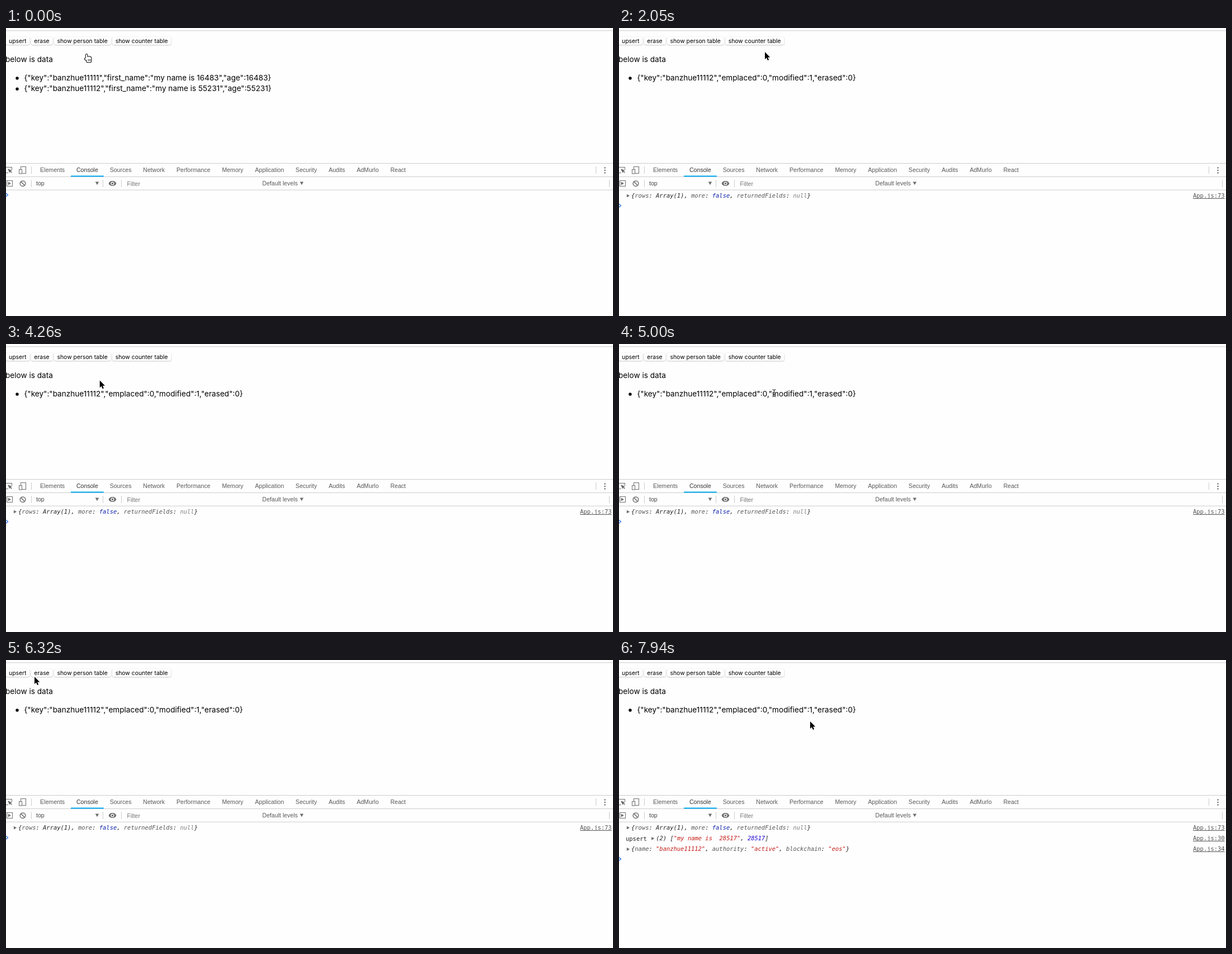
An HTML page with a canvas that plays this animation: 1086x516 px, repeating every 8 s.

```html
<!DOCTYPE html>
<html lang="en">
<head>
<meta charset="utf-8">
<title>Table viewer</title>
<style>
html, body { margin: 0; width: 100%; height: 100%; overflow: hidden; background: #fefefe; }
canvas { display: block; }
</style>
</head>
<body>
<canvas id="stage" width="1086" height="516"></canvas>
<script>
const ctx = document.getElementById('stage').getContext('2d');
const W = 1086, H = 516, LOOP = 8000, STEP = 147;
const PAGE = '13.6px Inter, "Noto Sans", sans-serif';
const BUTTON = '10.4px Inter, "Noto Sans", sans-serif';
const TOOL = '10.6px "Liberation Sans", Arial, sans-serif';
const MONO = '10.46px "DejaVu Sans Mono", monospace';
const INK = '#6e6e6e', RULE = '#ccc', DARK = '#222';
const ROW = 19.2;

const user = 'banzhue1111';
const person = (n, age) => `{"key":"${user}${n}","first_name":"my name is ${age}","age":${age}}`;
const people = [person(1, 16483), person(2, 55231)];
const counters = [`{"key":"${user}2","emplaced":0,"modified":1,"erased":0}`];
const buttons = ['upsert', 'erase', 'show person table', 'show counter table'];
const tabs = ['Elements', 'Console', 'Sources', 'Network', 'Performance', 'Memory',
  'Application', 'Security', 'Audits', 'AdMurlo', 'React'];
const logs = [
  { at: 11, link: 'App.js:73', body: '{rows: Array(1), more: false, returnedFields: null}' },
  { at: 47, link: 'App.js:30', label: 'upsert', body: '(2) ["my name is  28517", 28517]' },
  { at: 48, link: 'App.js:34', body: `{name: "${user}2", authority: "active", blockchain: "eos"}` }
];

// Pointer waypoints: step, x, y
const path = [
  [0, 140, 46], [2, 64, 36], [6, 195, 31], [8, 255, 23], [10, 255, 23], [14, 261, 43],
  [17, 253, 105], [19, 331, 95], [24, 125.5, 90], [26, 86, 90], [30, 195, 57],
  [34, 277.5, 88], [38, 380, 103], [43, 51, 30], [45, 19, 25], [47, 19, 25], [54, 342, 110]
];

function text(s, x, y, font, color) {
  ctx.font = font;
  ctx.fillStyle = color;
  ctx.fillText(s, x, y);
  return x + ctx.measureText(s).width;
}

function rect(x, y, w, h, color) {
  ctx.fillStyle = color;
  ctx.fillRect(x, y, w, h);
}

function box(x, y, w, h) {
  ctx.strokeStyle = INK;
  ctx.lineWidth = 1;
  ctx.strokeRect(x, y, w, h);
}

function line(points, color, width = 1) {
  ctx.beginPath();
  points.forEach(([x, y]) => ctx.lineTo(x, y));
  ctx.strokeStyle = color;
  ctx.lineWidth = width;
  ctx.stroke();
}

function dot(x, y, r, color) {
  ctx.beginPath();
  ctx.arc(x, y, r, 0, 7);
  ctx.fillStyle = color;
  ctx.fill();
}

// Triangle around a centre, pointing right or down
function triangle(x, y, r, down) {
  ctx.save();
  ctx.translate(x, y);
  if (down) ctx.rotate(Math.PI / 2);
  ctx.beginPath();
  ctx.moveTo(-r * .9, -r);
  ctx.lineTo(r * .9, 0);
  ctx.lineTo(-r * .9, r);
  ctx.fillStyle = INK;
  ctx.fill();
  ctx.restore();
}

// Outline first, fill on top, so overlapping parts merge
function silhouette(shape, fill, edge, width) {
  ctx.strokeStyle = edge;
  ctx.lineWidth = width;
  ctx.stroke(shape);
  ctx.fillStyle = fill;
  ctx.fill(shape);
}

const arrowShape = new Path2D('M0 0V13L3 10.3L5 15L7.2 14L5.2 9.5H9.3Z');
const handShape = new Path2D();
handShape.roundRect(2.8, 1, 2.6, 10, 1.3);
handShape.roundRect(1, 8, 6, 3, 1.5);
handShape.roundRect(4, 5.5, 8.4, 9.8, 2.5);

const arrow = () => silhouette(arrowShape, '#000', '#fff', 2);

function hand() {
  silhouette(handShape, '#fff', '#000', 2);
  for (let x = 7; x < 12; x += 2) line([[x, 10], [x, 13]], '#000', .8);
}

function beam() {
  for (const [color, width] of [['#fff', 2.2], [DARK, 1.1]]) {
    line([[0, -6], [0, 6]], color, width);
    for (const y of [-6.5, 6.5]) line([[-3, y], [0, y * .85], [3, y]], color, width);
    line([[-1.8, 2.5], [1.8, 2.5]], color, width);
  }
}

function button(label, x) {
  ctx.font = BUTTON;
  const width = ctx.measureText(label).width;
  ctx.save();
  ctx.beginPath();
  ctx.roundRect(x - 5.5, 16, width + 11.5, 14.2, 3.5);
  ctx.shadowColor = 'rgba(0,0,0,.35)';
  ctx.shadowBlur = 1.5;
  ctx.shadowOffsetY = .6;
  ctx.fillStyle = '#fff';
  ctx.fill();
  ctx.restore();
  return text(label, x, 27, BUTTON, '#000') + 13.8;
}

function page(rows) {
  rect(0, 4.3, W, 1, RULE);
  buttons.reduce((x, label) => button(label, x), 5);
  text('below is data', -1, 61, PAGE, '#000');
  rows.forEach((row, i) => {
    dot(20, 90 + i * ROW, 2.7, '#000');
    text(row, 32.5, 94 + i * ROW, PAGE, '#000');
  });
}

function tabBar() {
  rect(0, 242, W, 1, RULE);
  rect(0, 266, W, 1, RULE);
  let x = 61;
  for (const name of tabs) {
    const active = name === 'Console';
    const end = text(name, x, 258, TOOL, active ? '#333' : '#5a5a5a');
    if (active) rect(x - 10, 264.5, end - x + 20, 2, '#03a9f4');
    x = end + 20.8;
  }
  box(-1, 249.5, 11.5, 10);
  rect(4, 254, 8, 7, '#fefefe');
  ctx.save();
  ctx.translate(3, 252);
  ctx.rotate(-.4);
  ctx.scale(.65, .65);
  ctx.fillStyle = INK;
  ctx.fill(arrowShape);
  ctx.restore();
  box(26.5, 248.5, 9, 12);
  rect(23, 253, 6, 8, '#fefefe');
  box(23.5, 253.5, 5, 7.5);
  for (const s of [45, 1055]) rect(s, 248, 1, 13, RULE);
  for (let y = 250.5; y < 260; y += 4.5) dot(1071.5, y, 1.3, INK);
}

function filterBar() {
  rect(0, 289.7, W, 1, RULE);
  for (const x of [45, 173, 206, 1079]) rect(x, 272, 1, 13, RULE);
  box(1.5, 273.5, 10, 10);
  triangle(6.3, 278.5, 3);
  ctx.beginPath();
  ctx.arc(30, 278.7, 4.8, 0, 7);
  ctx.strokeStyle = INK;
  ctx.lineWidth = 1.5;
  ctx.stroke();
  line([[26.7, 275.4], [33.3, 282]], INK, 1.5);
  ctx.beginPath();
  ctx.ellipse(190.5, 278.5, 6.7, 4.4, 0, 0, 7);
  ctx.fillStyle = INK;
  ctx.fill();
  dot(190.5, 278.5, 3, '#fff');
  dot(190.5, 278.5, 1.7, INK);
  text('top', 54, 282, TOOL, '#444');
  text('Filter', 216.5, 282.5, TOOL, '#777');
  text('Default levels', 458.5, 282, TOOL, '#5a5a5a');
  for (const x of [163, 529]) triangle(x, 278.3, 3.2, true);
}

function tokenColor(token, next) {
  if (token[0] === '"') return '#c41a16';
  if (token === 'null') return '#808080';
  if (token === 'false') return '#0d22aa';
  if (/^\d{5}$/.test(token)) return '#1c00cf';
  return next?.startsWith(':') ? '#565656' : DARK;
}

function log({ link, label, body }, i) {
  const y = 304 + i * ROW;
  let x = 14;
  if (label) x = text(label, 12, y + .5, MONO, DARK) + 8.5;
  triangle(x + 2.5, y - 3.4, 2.9);
  x += 8;
  const tokens = body.split(/("[^"]*"|\w+(?=:)|false|null|\b\d{5}\b)/);
  tokens.forEach((token, k) => {
    if (token) x = text(token, x, y, 'italic ' + MONO, tokenColor(token, tokens[k + 1]));
  });
  const end = text(link, 1027, y - .5, MONO, '#545454');
  rect(1027, Math.round(y + 1), end - 1027, 1, '#545454');
}

function pointer(step) {
  const i = path.findLastIndex(p => p[0] <= step);
  const a = path[i], b = path[i + 1] || a;
  const k = (step - a[0]) / (b[0] - a[0] || 1);
  const x = a[1] + (b[1] - a[1]) * k, y = a[2] + (b[2] - a[2]) * k;
  const onButton = step < 1 || y < 28;
  const onRow = Math.abs(y - 90) < 10 && x < 420;
  ctx.save();
  ctx.translate(x, y);
  (onButton ? hand : onRow ? beam : arrow)();
  ctx.restore();
}

function draw(now) {
  const step = Math.floor((now % LOOP + 12) / STEP);
  const shown = logs.filter(l => step >= l.at);
  rect(0, 0, W, H, '#fefefe');
  page(shown.length ? counters : people);
  tabBar();
  filterBar();
  shown.forEach(log);
  const y = 299 + shown.length * ROW;
  line([[0, y - 3], [3.5, y], [0, y + 3]], '#367cf1', 1.4);
  pointer(step);
}

let start;
function tick(now) {
  start ??= now;
  draw(now - start);
  requestAnimationFrame(tick);
}
requestAnimationFrame(tick);
</script>
</body>
</html>
```
